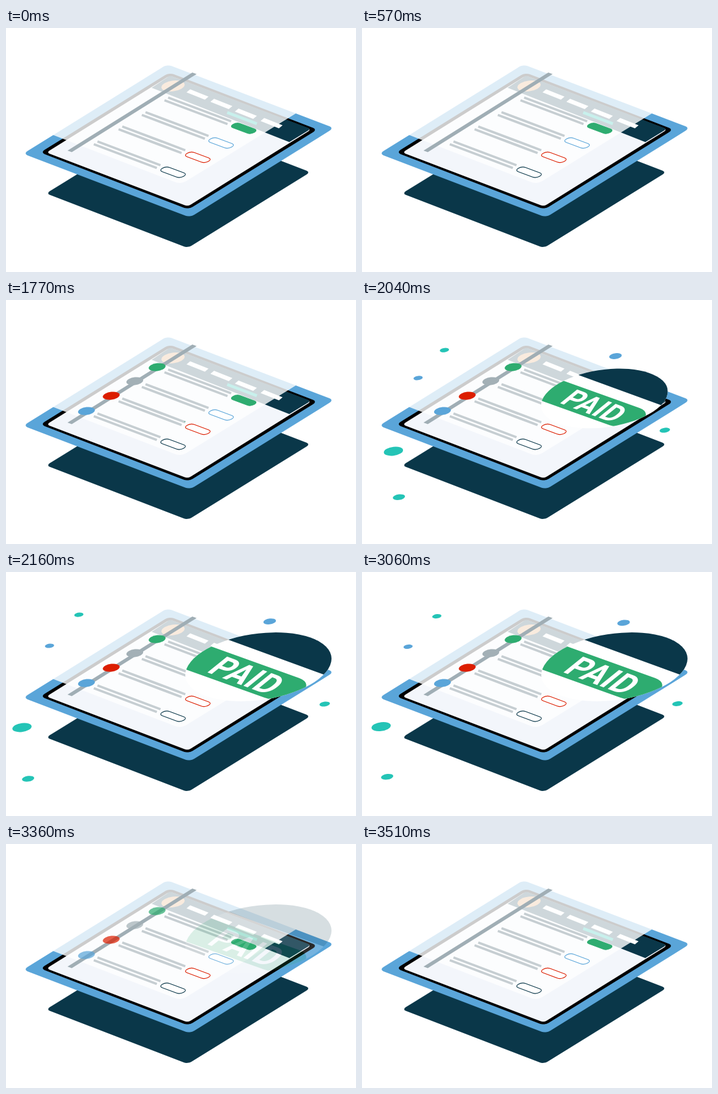
These frames come from a looping animation (572 by 400 pixels, 3.63 s). An HTML page:

```html
<!DOCTYPE html>
<html>
<head>
<meta charset="utf-8">
<style>
  html, body { margin: 0; width: 100%; height: 100%; overflow: hidden; background: #fff; }
  svg { display: block; width: 100vw; height: 100vh; }
  .pill { vector-effect: non-scaling-stroke; stroke-width: 1.15; }
</style>
</head>
<body>
<svg viewBox="0 0 572 400">
  <defs>
    <clipPath id="lens"><circle r="1" transform="matrix(119.5 -13.4 0 54.8 412.5 155.500)"/></clipPath>
  </defs>
  <g id="confetti"></g>
  <g id="tablet"></g>
  <path fill="#0a3749" d="M238 98L265 80Q268 78 272 79.500L493 163.500Q498 166 494 168L463 187Z"/>

  <!-- translucent card -->
  <path fill="#fff" opacity=".8" d="M76 175L265 57L475 139.200L296 250Q285 257 275 252Z"/>
  <path stroke="#c8f0ec" stroke-width="5" d="M361.500 138.500L410 157"/>
  <g id="card"></g>
  <path fill="#a0aeb5" d="M100.500 201L107.500 203.500L311.500 75.500L304.500 73Z"/>
  <g id="dots"></g>

  <g id="zoom">
    <g clip-path="url(#lens)">
      <path fill="#fff" d="M280 90H540V220H280Z"/>
      <path fill="#0a3749" d="M340 102.600L540 175.600V80H340Z"/>
      <rect fill="#2eac70" x="-300" y="-39.800" width="339.800" height="79.600" rx="39.800"
            transform="matrix(1 -.112 0 .464 451 190) rotate(45.500)"/>
      <text fill="#fff" font-family="Roboto, sans-serif" font-weight="700" font-size="44.300"
            transform="matrix(1.070 .400 -1.020 .825 326.200 163.500)">PAID</text>
    </g>
  </g>
</svg>
<script>
const LOOP = 3630;
const BLUE = '#5aa5d9', RED = '#dc1e00', GREY = '#a3b0b6', GREEN = '#2eac70', TEAL = '#24c4b6', NAVY = '#0a3749';
const $ = id => document.getElementById(id);

function add(parent, tag, attrs) {
  const el = document.createElementNS('http://www.w3.org/2000/svg', tag);
  for (const name in attrs) el.setAttribute(name, attrs[name]);
  return $(parent).appendChild(el);
}

// Lays a shape flat on the tilted plane.
const flat = (x, y, scale = 1) => `matrix(${scale} ${-.112 * scale} 0 ${.464 * scale} ${x} ${y})`;
const disc = (parent, x, y, r, fill) => add(parent, 'circle', { r, fill, transform: flat(x, y) });

// A tilted rounded rectangle, given its left, top and right corners.
function slab([lx, ly], [tx, ty], [rx, ry], radius, fill) {
  const width = rx - tx, height = tx - lx;
  add('tablet', 'rect', {
    width, height, rx: radius, fill,
    transform: `matrix(1 ${(ry - ty) / width} -1 ${(ly - ty) / height} ${tx} ${ty})`
  });
}

slab([65.5, 271.3], [266, 147], [497.5, 236.3], 6, NAVY);
slab([28, 206], [263.5, 59.5], [536, 164], 7, BLUE);
slab([56, 204], [267, 73], [509, 166.5], 7, '#000');
slab([66, 204], [268, 78], [499, 166.5], 5, '#f3f6fb');

disc('card', 273, 95, 19, '#f9ebde');
for (const [x, y] of [[313, 108.5], [352, 124], [392, 140], [434, 155.5]])
  add('card', 'path', { fill: '#fff', d: `M${x - 12} ${y - 8}l30 12l-6 5l-30 -12Z` });

const rows = [[0, 0, GREEN], [-37, 24, BLUE], [-75, 47.5, RED], [-115.5, 72, NAVY]];
rows.forEach(([dx, dy, color], i) => {
  add('card', 'path', {
    stroke: '#c6ced2', 'stroke-width': 4,
    d: `M${265 + dx} ${114 + dy}l103 39M${259 + dx} ${118.5 + dy}l103 39`
  });
  add('card', 'rect', {
    class: 'pill', x: -25.5, y: -8.5, width: 51, height: 17, rx: 8.5,
    fill: i ? '#fff' : color, stroke: color,
    transform: flat(388.5 + dx, 164.5 + dy) + ' rotate(46.5)'
  });
});

const dots = [
  [131.5, 182, BLUE, 240], [172, 157, RED, 540], [210.5, 133, GREY, 960], [247, 110, GREEN, 1410]
].map(([x, y, fill, start]) => ({ x, y, start, el: disc('dots', x, y, 13.75, fill) }));

const confetti = [
  [-244, 68, 15.7, TEAL], [-234, 152, 10, TEAL], [-151, -117, 7.5, TEAL],
  [-199, -66, 7.5, BLUE], [161, -106, 10.3, BLUE], [251, 29.5, 8.5, TEAL]
].map(([x, y, r, fill]) => ({ x, y, el: disc('confetti', 270, 187, r, fill) }));

const progress = (t, from, to) => Math.min(1, Math.max(0, (t - from) / (to - from)));
const easeInOut = p => .5 - .5 * Math.cos(Math.PI * p);

function draw(t) {
  for (const { x, y, start, el } of dots)
    el.setAttribute('transform', flat(x, y, easeInOut(progress(t, start, start + 180))));
  $('dots').setAttribute('opacity', 1 - progress(t, 3300, 3510));

  const spread = 1 - (1 - progress(t, 1770, 2170)) ** 2 - progress(t, 3030, 3240) ** 2;
  for (const { x, y, el } of confetti)
    el.setAttribute('transform', flat(270 + x * spread, 187 + y * spread));

  const size = easeInOut(progress(t, 1740, 2135));
  $('zoom').setAttribute('transform', `translate(290 200) scale(${size}) translate(-290 -200)`);
  $('zoom').setAttribute('opacity', 1 - progress(t, 3210, 3390));
}

const began = performance.now();
function tick() {
  draw((performance.now() - began) % LOOP);
  requestAnimationFrame(tick);
}
tick();
</script>
</body>
</html>
```
